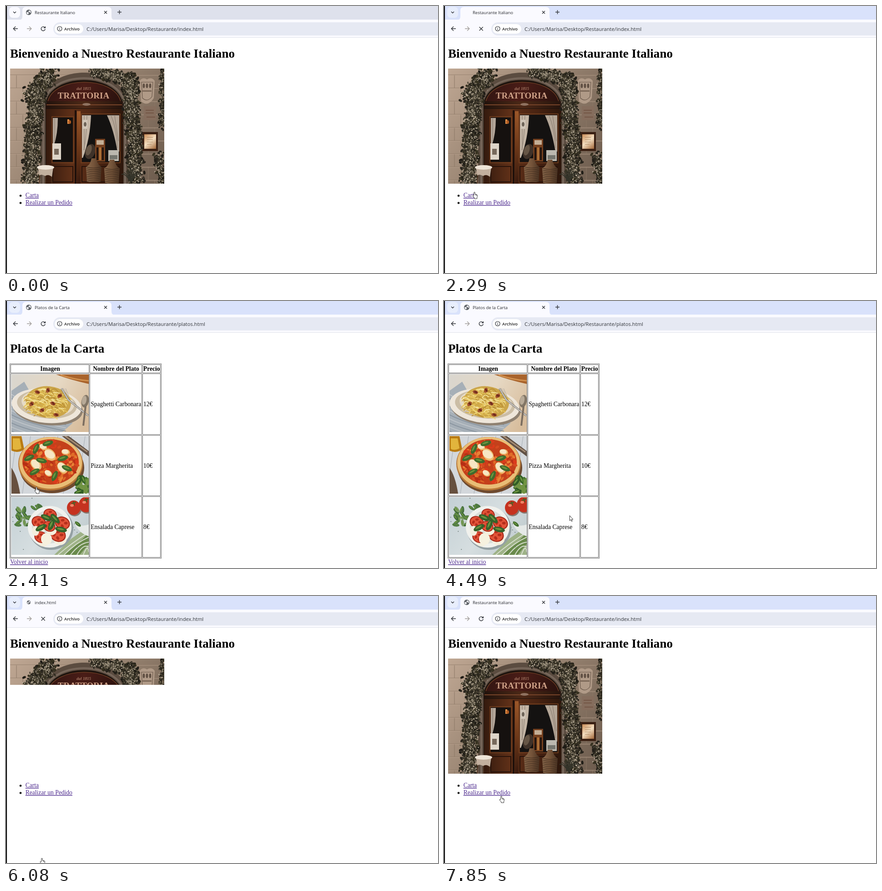
An HTML page with a canvas that plays this animation: 950 by 589 pixels, repeating every 8000 ms.

```html
<!DOCTYPE html>
<html lang="es">
<head>
<meta charset="utf-8">
<title>Restaurante Italiano</title>
<style>
html, body { margin: 0; width: 100%; height: 100%; overflow: hidden; background: #fff; }
#stage { position: relative; width: 950px; height: 589px; overflow: hidden; background: #fff; }
canvas, svg { position: absolute; display: block; }
svg { left: 0; top: 0; }
.ui { font-family: "Open Sans", "Noto Sans", sans-serif; }
.page { font-family: "Liberation Serif", "Times New Roman", serif; font-size: 13.57px; }
.h1 { font-size: 27.15px; font-weight: bold; }
.th { font-weight: bold; text-anchor: middle; }
.link { fill: #4d2a8e; text-decoration: underline; }
.link.down { fill: #e00000; }
.line { fill: none; stroke: #6f6f6f; stroke-width: 1; }
.icon { fill: none; stroke: #33363b; stroke-width: 1.4; }
</style>
</head>
<body>
<div id="stage">
  <canvas id="facade" width="339" height="254" style="left:9px;top:138px"></canvas>
  <canvas id="pasta" class="dish" width="170" height="127" style="left:12px;top:162px"></canvas>
  <canvas id="pizza" class="dish" width="170" height="127" style="left:12px;top:298px"></canvas>
  <canvas id="salad" class="dish" width="170" height="127" style="left:12px;top:433px"></canvas>

  <svg width="950" height="589" viewBox="0 0 950 589">
    <g class="ui">
      <rect id="strip" width="950" height="31"/>
      <rect id="search" x="7" y="2" width="24" height="24" rx="8"/>
      <path class="icon" d="M16 12.5l3 3 3-3"/>
      <path fill="#fafaff" d="M28 31Q36 31 36 23V10Q36 2 44 2H224Q232 2 232 10V23Q232 31 240 31Z"/>
      <rect y="30" width="950" height="40" fill="#fafaff"/>
      <rect y="69" width="950" height="1" fill="#dfe2ea"/>
      <g id="globe">
        <circle r="6" fill="#5f6368"/>
        <path fill="#fafaff" d="M-4.8-.6L-1.6-.4Q-.2.6.6 2L-1 2.6-1.2 4.7Q-4.6 3.6-4.8-.6ZM.6-4.8Q4.6-4 4.8.4L3.4 1.2 2.2-.8-.8-1.2-.6-2.8 1.2-3.2Z"/>
      </g>
      <text id="title" x="63" y="18" font-size="9.5" fill="#2a2c30"></text>
      <path class="icon" d="M216 11l6 6m0-6l-6 6M245 13.5h9M249.5 9v9"/>
      <path class="icon" d="M26 50H16.5M21 45.2L16.2 50l4.8 4.8"/>
      <path class="icon" style="stroke:#a39f9c" d="M46 50h9.5M51 45.2l4.8 4.8-4.8 4.8"/>
      <path id="reload" class="icon" d="M85.6 47.8A4.5 4.5 0 1 0 86.2 51M86.4 45v3.4H83"/>
      <path id="stop" class="icon" d="M77.7 46.2l8 8m0-8l-8 8"/>
      <rect x="104" y="36" width="880" height="29" rx="14.5" fill="#e6e9f3"/>
      <rect x="107" y="40" width="63" height="21" rx="10.5" fill="#fff"/>
      <circle class="icon" cx="118" cy="50" r="5" style="stroke-width:1.2"/>
      <path class="icon" d="M118 49.3v3.5M118 46.8v1.3" style="stroke-width:1.2"/>
      <text x="128" y="53.5" font-size="9.4" font-weight="600" fill="#222">Archivo</text>
      <text id="url" x="177" y="54.5" font-size="11.2" fill="#34373c"></text>
    </g>

    <g id="home" class="page">
      <text class="h1" x="9" y="113.6">Bienvenido a Nuestro Restaurante Italiano</text>
      <circle cx="32" cy="418.5" r="2.3"/>
      <circle cx="32" cy="434.5" r="2.3"/>
      <text id="toMenu" class="link" x="42.7" y="422.3">Carta</text>
      <text class="link" x="42.7" y="438.2">Realizar un Pedido</text>
    </g>

    <g id="menu" class="page">
      <text class="h1" x="9" y="113.6">Platos de la Carta</text>
      <g id="grid" class="line"></g>
      <text class="th" x="97" y="153.6">Imagen</text>
      <text class="th" x="242" y="153.6">Nombre del Plato</text>
      <text class="th" x="320.2" y="153.6">Precio</text>
      <text x="186.2" y="232">Spaghetti Carbonara</text><text x="302" y="232">12€</text>
      <text x="186.2" y="367.5">Pizza Margherita</text><text x="302" y="367.5">10€</text>
      <text x="186.2" y="503">Ensalada Caprese</text><text x="302" y="503">8€</text>
      <text id="toHome" class="link" x="9" y="580">Volver al inicio</text>
    </g>

    <rect width="2" height="589" fill="#000"/>
    <g id="cursor" fill="#fff" stroke="#222" stroke-width=".9" stroke-linejoin="round">
      <path id="arrow" d="M.4.4V11.6L2.9 9.3 4.6 13.2 6.2 12.5 4.6 8.7H7.8Z"/>
      <path id="hand" d="M-1.2 8.2V1.2Q0-.5 1.2 1.2V5.3L5.4 6.2Q6.7 6.7 6.5 8.5L5.6 12.6V15H-.2V13.1L-3.9 9Q-4 7.4-2.6 7.4ZM3 6V8.2M4.8 6.5V8.4"/>
    </g>
  </svg>
</div>

<script>
const $ = id => document.getElementById(id);
const LOOP = 8000;

// ---------- drawing helpers ----------
function seeded(s) {
  return () => (s = (s * 16807) % 2147483647) / 2147483647;
}

function brush(id, seed) {
  const c = $(id).getContext('2d');
  const rnd = seeded(seed);
  const b = {
    c, rnd,
    pick: list => list[Math.floor(rnd() * list.length)],
    box(x, y, w, h, col) { c.fillStyle = col; c.fillRect(x, y, w, h); },
    oval(x, y, rx, ry, col, rot = 0) {
      c.fillStyle = col;
      c.beginPath();
      c.ellipse(x, y, rx, ry, rot, 0, 7);
      c.fill();
    },
    shape(d, col) { c.fillStyle = col; c.fill(new Path2D(d)); },
    stroke(d, col, w = 1) { c.strokeStyle = col; c.lineWidth = w; c.stroke(new Path2D(d)); },
    fade(x0, y0, x1, y1, ...cols) {
      const g = c.createLinearGradient(x0, y0, x1, y1);
      cols.forEach((col, i) => g.addColorStop(i / (cols.length - 1), col));
      return g;
    },
    leaf(x, y, len, rot, col = '#3f6b2c') {
      b.oval(x, y, len, len * .45, col, rot);
      b.oval(x - 1, y - 1, len * .6, len * .15, '#6d9440', rot);
    },
    // foliage around the line from (x0,y0) to (x1,y1): dark mass first, light leaves last
    vine(x0, y0, x1, y1, spread, n) {
      const layers = [['#1f1c16', '#2a261e', '#35301f'], ['#3b3628', '#4a4434', '#2d2920'], ['#6b6250', '#8d8370', '#bdb19d']];
      for (let i = 0; i < n; i++) {
        const depth = Math.floor(i / n * 3), r = [4.2, 2.6, 1.6][depth];
        const u = rnd(), off = () => (rnd() + rnd() - 1) * spread;
        b.oval(x0 + (x1 - x0) * u + off(), y0 + (y1 - y0) * u + off(), r, r * .6, b.pick(layers[depth]), rnd() * 6);
      }
    }
  };
  return b;
}

// ---------- pictures ----------
function drawFacade() {
  const b = brush('facade', 41), { c, box, oval, shape, stroke, fade, vine } = b;
  box(0, 0, 339, 254, fade(0, 0, 339, 254, '#bfa793', '#94806e', '#6b5a4c'));
  for (let y = 14, i = 0; y < 254; y += 29, i++) {
    stroke(`M0 ${y}H339M${14 + i % 2 * 14} ${y}v29M${318 - i % 2 * 14} ${y}v29`, '#8a7765', 1);
    stroke(`M0 ${y + 1}H339`, '#c6b09b', .6);
  }
  // stone arch, wooden frame and sign
  shape('M66 254V84C70-16 255-16 260 84V254Z', '#5b4c40');
  stroke('M73 254V82C80 1 245 1 253 82V254', '#76665a', 4);
  shape('M78 254V78C88 8 236 8 248 78V254Z', '#1c120d');
  shape('M83 72C98 16 228 16 243 72Z', fade(80, 20, 240, 70, '#2f1411', '#4a1d17', '#2b120e'));
  stroke('M83 72C98 16 228 16 243 72', '#6a3b23', 1.5);
  c.textAlign = 'center';
  c.fillStyle = '#cfa187';
  c.font = 'bold 19px "Liberation Serif", serif';
  c.fillText('TRATTORIA', 161.5, 66);
  c.font = 'italic 9px "Liberation Serif", serif';
  c.fillText('dal 1815', 162, 47);
  box(78, 72, 170, 16, fade(78, 0, 248, 0, '#21120c', '#4c2917', '#26140d'));
  box(80, 79, 166, 2, '#774429');
  oval(168, 79, 9, 3, '#8f7260');
  // doors
  box(79, 89, 170, 165, fade(79, 0, 249, 0, '#341a0e', '#5f3018', '#4a2412', '#2d170c'));
  box(94, 108, 44, 98, '#15110f');
  box(158, 102, 82, 104, '#141211');
  box(142, 92, 4, 162, '#1f100a');
  box(147, 94, 8, 160, fade(0, 94, 0, 254, '#9b5729', '#6d3819', '#381a0e'));
  stroke('M92 106H140V208H92ZM156 100H242V208H156Z', '#74401f', 1.5);
  stroke('M94 216H138V250H94ZM158 216H240V250H158Z', '#26120a', 2);
  shape('M94 109H105Q105 145 96 170H94Z', '#b4a79a');
  shape('M158 103H178Q176 155 160 197H158Z', '#c3b5a5');
  shape('M213 103H240V183H236Q228 135 213 103Z', '#b5a798');
  stroke('M98 110V160M163 104V180M169 104Q168 150 162 180M222 104Q234 130 236 175M230 104L238 160', '#85786c', 1);
  box(126, 112, 4, 10, '#e5924a');
  oval(131, 118, 3, 4, '#b05c22');
  box(93, 165, 19, 36, '#ddd4c8');
  box(97, 177, 10, 13, '#77695c');
  box(160, 113, 10, 20, '#d0c5b7');
  oval(165, 123, 3, 5, '#6d6358');
  // goods in the window
  oval(176, 183, 11, 17, '#3f3229', .3);
  oval(173, 180, 6, 12, '#665646', .3);
  box(187, 155, 22, 50, '#74401f');
  box(190, 158, 16, 10, '#c3ae96');
  for (let i = 0; i < 3; i++) box(190 + i * 6, 174, 4, 28, i % 2 ? '#b07539' : '#21140e');
  box(216, 180, 23, 24, '#bbb8af');
  box(219, 191, 17, 9, '#75766f');
  // wicker baskets
  for (const [x, y] of [[184, 226], [224, 229]]) {
    shape(`M${x - 5} ${y - 28}h10Q${x + 8} ${y - 14} ${x + 17} ${y - 9}L${x + 15} ${y + 24}H${x - 15}L${x - 17} ${y - 9}Q${x - 7} ${y - 14} ${x - 5} ${y - 28}`,
      fade(x - 17, 0, x + 17, 0, '#8d6c4e', '#745339', '#4b3423'));
    for (let k = -9; k < 24; k += 4)
      stroke(`M${x - 16} ${y + k}q16 5 32 0`, k % 8 ? '#3f2c1e' : '#a07b58', 1.1);
  }
  // wall sign, plaque and lit menu box
  shape('M285 27Q292 18 301 24Q311 18 318 27L316 65Q303 86 288 72Z', '#b09a87');
  stroke('M289 30H314L312 62Q302 75 291 65Z', '#6a584a', 1.2);
  for (let i = 0; i < 3; i++) oval(294 + i * 7, 38, 2.4, 5, '#5f4e42');
  box(291, 48, 20, 3, '#7c6858');
  box(294, 83, 27, 31, '#856d5d');
  stroke('M298 92h18M298 98h18M300 107h19', '#63402f', 1.2);
  box(290, 140, 35, 42, '#3a2013');
  box(295, 145, 26, 32, fade(295, 145, 320, 177, '#c98c57', '#f3dec0', '#a56c3e'));
  stroke('M301 152h13M301 157h13M301 162h13M301 167h10', '#a98564', 1);
  // plants
  vine(90, 12, 45, 62, 22, 650);
  vine(60, 40, 48, 150, 22, 900);
  vine(50, 140, 44, 254, 21, 850);
  vine(185, 6, 272, 26, 17, 650);
  vine(264, 22, 268, 115, 20, 750);
  vine(270, 110, 278, 254, 20, 900);
  vine(336, 0, 336, 130, 10, 260);
  vine(328, 190, 336, 254, 14, 220);
  for (let i = 0; i < 9; i++)
    stroke(`M266 252Q${252 + i * 3} 228 ${245 + i * 5} ${218 + Math.abs(i - 4) * 4}`, '#34342a', 1.8);
  // bistro table
  stroke('M66 224L64 254M90 224L92 254M78 230V254', '#4a2f1d', 2);
  shape('M61 218H95L92 239Q84 232 77 237Q69 232 64 236Z', '#c2b09e');
  oval(78, 218, 19, 5, '#eee4d7');
}

function drawPasta() {
  const { rnd, pick, box, oval, shape, stroke, fade } = brush('pasta', 17);
  box(0, 0, 170, 127, fade(0, 0, 170, 100, '#d9d6cf', '#e6d8c3', '#d7bc9b'));
  shape('M98 0H170V21Q130 12 98 0', '#a9632b');
  stroke('M108 1Q140 12 170 14', '#d1914f', 3);
  shape('M0 36L28 16 70 90 135 107 112 127H0Z', '#a6afb7');
  for (let i = 0; i < 12; i++) stroke(`M0 ${44 + i * 9}Q40 ${70 + i * 8} 120 ${90 + i * 7}`, i % 2 ? '#828e99' : '#c4c9cd', 1.5);
  oval(80, 75, 77, 37, '#8f8171', .1);
  oval(77, 69, 77, 38, '#eee6da', .1);
  oval(78, 66, 66, 31, '#cbbda5', .1);
  oval(80, 63, 58, 29, '#e5dac8', .1);
  oval(81, 61, 50, 35, '#cba54a', .1);
  for (let i = 0; i < 150; i++) {
    const a = rnd() * 6.3, r = Math.sqrt(rnd()), x = 81 + Math.cos(a) * r * 42, y = 60 + Math.sin(a) * r * 31;
    stroke(`M${x - 15} ${y + rnd() * 8}q${rnd() * 16} ${-18 * rnd()} ${16 + rnd() * 12} ${rnd() * 8}`,
      pick(['#f0d77c', '#e4c35c', '#b98d32', '#f5e5a0', '#d8b148']), 1.8);
  }
  for (const [x, y] of [[57, 39], [80, 35], [106, 47], [91, 64], [44, 65], [98, 89], [67, 79]]) {
    oval(x, y, 6, 4, '#a3532f', rnd() * 3);
    oval(x + 1, y, 4, 2, '#6f2b1e', rnd());
  }
  stroke('M110 31L125 56L169 91', '#77736e', 4);
  stroke('M110 31L125 56L169 91', '#d2cfcb', 2);
  stroke('M114 30L126 51M119 31L128 52', '#aaa59f', 1);
  oval(162, 59, 8, 14, '#827666', .2);
  oval(160, 57, 5, 10, '#b8aa97', .2);
  stroke('M163 70L158 113', '#7b6e60', 4);
}

function drawPizza() {
  const { rnd, pick, box, oval, shape, stroke, leaf } = brush('pizza', 29);
  box(0, 0, 170, 127, '#d3d7db');
  for (let x = 12; x < 170; x += 30) stroke(`M${x} 0L${x - 18} 127`, '#b2b8be', 1.4);
  shape('M0 0H22L28 29Q15 39 0 32Z', '#b97b13');
  shape('M3 5H18L22 27Q10 33 3 28Z', '#e2b43c');
  shape('M111 0H126L170 33V45Z', '#605044');
  stroke('M118 0L167 35', '#a58c74', 3);
  shape('M0 70Q13 88 19 127H0Z', '#67503f');
  oval(89, 70, 71, 56, '#6e4a2f');
  oval(86, 61, 71, 59, '#b87938');
  oval(86, 59, 69, 57, '#e9bd76');
  oval(86, 57, 62, 50, '#c4401b');
  for (let i = 0; i < 230; i++) {
    const a = rnd() * 6.3, r = Math.sqrt(rnd());
    oval(86 + Math.cos(a) * r * 59, 57 + Math.sin(a) * r * 47, 2 + rnd() * 4, 1 + rnd() * 3,
      pick(['#d54a20', '#e06c28', '#b62e15', '#dc3b1c', '#e98336']), rnd() * 3);
  }
  for (const [x, y, r] of [[85, 41, 15], [54, 63, 14], [112, 70, 14], [81, 82, 9], [70, 24, 9], [119, 35, 9]]) {
    oval(x, y, r, r * .7, '#edbd73', rnd());
    oval(x - 1, y - 1, r * .82, r * .55, '#f7e6c5', rnd());
  }
  for (const [x, y, a] of [[54, 28, 2], [80, 16, -.3], [39, 48, 2.7], [113, 49, -.3], [66, 54, .2], [51, 79, -.5], [95, 88, 2], [122, 71, .4]])
    leaf(x, y, 12, a);
  for (let i = 0; i < 15; i++) leaf(144 + rnd() * 27, 96 + rnd() * 30, 11, rnd() * 3, pick(['#44732c', '#315d25', '#739345']));
}

function drawSalad() {
  const { rnd, pick, box, oval, shape, stroke, fade, leaf } = brush('salad', 53);
  box(0, 0, 170, 127, fade(0, 0, 170, 127, '#c4d0d5', '#d6dee0', '#b8c5c8'));
  shape('M94 127L132 91 170 64V127Z', '#9eb287');
  shape('M116 127Q147 103 170 78V103L150 127Z', '#698a4b');
  for (let i = 0; i < 5; i++) stroke(`M${102 + i * 14} 127Q${132 + i * 9} 101 170 ${77 + i * 11}`, '#d8dfcf', 2);
  shape('M137 54Q151 67 170 60V86Q147 79 137 54', '#e5e9e7');
  for (let i = 0; i < 15; i++) leaf(14 + rnd() * 28, 24 + rnd() * 38, 8, rnd() * 3, pick(['#527d46', '#3e6936', '#7b9b67']));
  for (let i = 0; i < 6; i++) leaf(46 + rnd() * 18, 16 + rnd() * 9, 7, rnd() * 3, '#4b7740');
  leaf(146, 59, 8, .7);
  for (let i = 0; i < 25; i++) oval(rnd() * 165, rnd() * 120, 1, 1, '#697773');
  for (const [x, y, r] of [[137, 23, 15], [164, 16, 16]]) {
    oval(x + 2, y + 4, r, r, '#86776f');
    oval(x, y, r, r + 1, '#c5321f');
    oval(x - 4, y - 5, 4, 3, '#ef8467');
    stroke(`M${x - 5} ${y - 9}l10 -3m-6 -2l3 9`, '#426426', 2);
  }
  oval(87, 69, 49, 47, '#94a0a3');
  oval(84, 65, 48, 46, '#f0f1ed');
  oval(84, 65, 39, 37, '#dadeda');
  const slices = [[60, 55, 16], [85, 38, 15], [112, 57, 17], [102, 83, 18], [65, 88, 15], [83, 64, 14]];
  for (const [x, y, r] of slices) {
    oval(x + 5, y + 9, r * .8, r * .75, '#f4efdd');
    oval(x, y, r, r * .83, '#a72819', .4);
    oval(x, y, r * .86, r * .7, '#e25338', .4);
    for (let k = 0; k < 4; k++) oval(x + Math.cos(k * 1.6) * r * .45, y + Math.sin(k * 1.6) * r * .38, r * .24, r * .17, '#b52f1c', k);
  }
  oval(77, 92, 12, 13, '#f6f1df');
  oval(53, 74, 8, 11, '#f3eedd');
  for (const [x, y, a] of [[88, 61, 2], [77, 45, .4], [109, 71, .2], [65, 67, -.5], [96, 47, .8]]) leaf(x, y, 13, a, '#35632b');
}

drawFacade();
drawPasta();
drawPizza();
drawSalad();

// table borders: outer frame plus every cell
const cols = [[10.5, 182.5], [184.5, 298.5], [300.5, 339.5]];
const rows = [[140.5, 158.5], [160.5, 294.5], [296.5, 429.5], [431.5, 565.5]];
const frame = (x0, y0, x1, y1) => `<rect x="${x0}" y="${y0}" width="${x1 - x0}" height="${y1 - y0}"/>`;
$('grid').innerHTML = frame(8.5, 138.5, 341.5, 567.5) +
  rows.map(([y0, y1]) => cols.map(([x0, x1]) => frame(x0, y0, x1, y1)).join('')).join('');

// ---------- timeline ----------
const HOME = 'Restaurante Italiano', MENU = 'Platos de la Carta';
// time, page, tab title, loading, globe scale, visible photo height
const states = [
  [0, 'home', HOME, false, 1, 254],
  [2290, 'home', HOME, true, 0, 254],
  [2350, 'menu', 'platos.html', true, .7, 254],
  [2410, 'menu', MENU, false, 1, 254],
  [5990, 'menu', MENU, true, 0, 254],
  [6080, 'home', 'index.html', true, .7, 58],
  [6120, 'home', HOME, false, .7, 254],
  [6260, 'home', HOME, false, 1, 254]
];
// start, end, steps, ease power, from, bend, to
const moves = [
  [730, 930, 4, 1, [958, 513], [659, 468], [360, 424]],
  [1200, 1550, 6, 2, [360, 424], [-120, 285], [67, 410]],
  [3090, 3300, 4, 2, [67, 410], [300, 335], [376, 389]],
  [4490, 5190, 11, 4, [376, 389], [214, 538], [79, 578]],
  [6860, 7180, 6, 2, [79, 578], [110, 500], [154, 497]],
  [7510, 7850, 6, 2, [154, 497], [130, 470], [126, 441]]
];
const pointers = [[0, ''], [730, 'arrow'], [1550, 'hand'], [3090, 'arrow'], [5120, 'hand'], [6860, 'arrow'], [7850, 'hand']];

const at = (list, t) => list.filter(e => e[0] <= t).pop();
const show = (el, on) => { el.style.display = on ? '' : 'none'; };

function cursorPos(t) {
  const m = at(moves, t);
  if (!m) return [0, 0];
  const [t0, t1, n, power, a, b, c] = m;
  const step = Math.min(n - 1, Math.floor((t - t0) / (t1 - t0) * (n - 1) + .02));
  const u = 1 - (1 - (step + 1) / n) ** power, v = 1 - u;
  return a.map((p, i) => Math.round(v * v * p + 2 * u * v * b[i] + u * u * c[i]));
}

function render(t) {
  const [, page, title, loading, globe, height] = at(states, t);
  const home = page === 'home', focused = t >= 2010;
  show($('home'), home);
  show($('menu'), !home);
  show($('facade'), home);
  document.querySelectorAll('.dish').forEach(el => show(el, !home));
  $('facade').style.clipPath = `inset(0 0 ${254 - height}px 0)`;
  $('title').textContent = title;
  $('url').textContent = `C:/Users/Marisa/Desktop/Restaurante/${home ? 'index' : 'platos'}.html`;
  show($('reload'), !loading);
  show($('stop'), loading);
  show($('globe'), globe > 0);
  $('globe').setAttribute('transform', `translate(50 14) scale(${globe})`);
  $('strip').setAttribute('fill', focused ? '#d9e2fb' : '#dee1ec');
  $('search').setAttribute('fill', focused ? '#e8eefc' : '#fafaff');
  $('toMenu').classList.toggle('down', t >= 2010 && t < 2220);
  $('toHome').classList.toggle('down', t >= 5720 && t < 5990);

  const pointer = at(pointers, t)[1];
  show($('arrow'), pointer === 'arrow');
  show($('hand'), pointer === 'hand');
  $('cursor').setAttribute('transform', `translate(${cursorPos(t)})`);
}

const start = performance.now();
function tick() {
  render((performance.now() - start) % LOOP);
  requestAnimationFrame(tick);
}
tick();
</script>
</body>
</html>
```
